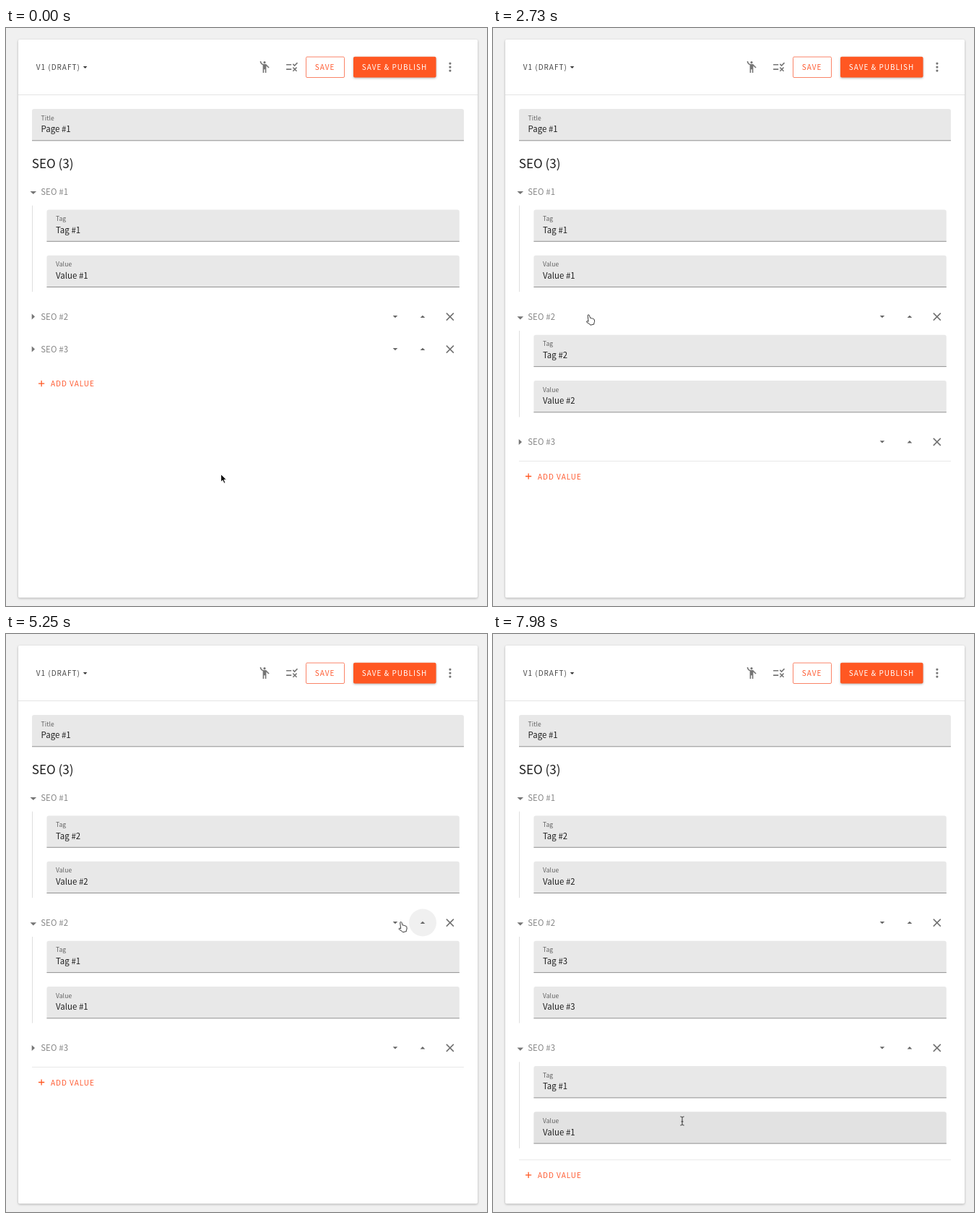
Recreate the animation shown at these times as an HTML page. Size 666 by 800 pixels, loop 8 s.

```html
<!DOCTYPE html>
<html lang="en">
<head>
<meta charset="utf-8">
<title>Reordering values</title>
<style>
  html, body { margin: 0; width: 100%; height: 100%; overflow: hidden; background: #f0f0f0; }
  svg.layer { position: absolute; left: 0; top: 0; width: 666px; height: 800px; }
  text { font-family: "Noto Sans CJK JP", "Noto Sans CJK SC", "Noto Sans CJK", "Open Sans", sans-serif; white-space: pre; }
  .button { font-size: 10px; font-weight: 500; letter-spacing: .99px; }
  .label { font-size: 8.55px; letter-spacing: .1px; fill: #606060; }
  .value { font-size: 11.4px; letter-spacing: .06px; fill: #202020; }
  .name { font-size: 11.4px; letter-spacing: .13px; fill: #868686; }
  .heading { font-size: 17.1px; fill: #1c1c1c; }
  .card { filter: drop-shadow(0 1px 1.5px rgba(0,0,0,.28)); }
  .publish { filter: drop-shadow(0 1.5px 1.5px rgba(0,0,0,.3)); }
  #glow {
    position: absolute; left: 26px; width: 614px; box-sizing: border-box;
    border: 2px solid rgb(77,213,192); border-radius: 2px;
    background: rgba(49,211,136,.16); box-shadow: 0 0 9px rgba(64,224,198,.75);
  }
</style>
</head>
<body>
<svg class="layer" id="page" viewBox="0 0 666 800"></svg>
<div id="glow"></div>
<svg class="layer" id="pointer" viewBox="0 0 666 800"></svg>
<script>
const LOOP = 8000, STEP = 70, BODY = 128.3;
const page = document.getElementById('page');
const glow = document.getElementById('glow');
const pointer = document.getElementById('pointer');

function add(parent, tag, attrs = {}, content) {
  const node = document.createElementNS('http://www.w3.org/2000/svg', tag);
  for (const key in attrs) node.setAttribute(key, attrs[key]);
  if (content) node.textContent = content;
  parent.append(node);
  return node;
}
const rect = (parent, x, y, width, height, attrs) =>
  add(parent, 'rect', { x, y, width, height, ...attrs });
const path = (parent, d, attrs) => add(parent, 'path', { d, ...attrs });
const text = (parent, x, y, content, cls, fill) =>
  add(parent, 'text', fill ? { x, y, class: cls, fill } : { x, y, class: cls }, content);
const move = (node, x, y) => node.setAttribute('transform', `translate(${x} ${y})`);
const show = (node, on) => node.setAttribute('visibility', on ? 'visible' : 'hidden');

function field(parent, x, y, width, label, value) {
  const box = path(parent, `M${x} ${y + 44}v-41q0-3 3-3h${width - 6}q3 0 3 3v41z`, { fill: '#e8e8e8' });
  rect(parent, x, y + 43.3, width, 1, { fill: '#929292' });
  text(parent, x + 12.5, y + 15.6, label, 'label');
  return { box, value: text(parent, x + 12.5, y + 32.3, value, 'value') };
}

function section(number, hasButtons) {
  const root = add(page, 'g');
  text(root, 48.2, 4.2, `SEO #${number}`, 'name');
  const closed = path(root, 'M35.7-4.2v8l4.3-4z', { fill: '#757575' });
  const opened = path(root, 'M33.5-.6h8.6l-4.3 4.2z', { fill: '#757575' });
  let circles = [];
  if (hasButtons) {
    circles = [539, 577].map(cx => add(root, 'circle', { cx, cy: -.3, r: 19, 'fill-opacity': 0 }));
    path(root, 'M535.6-1.9h6.6l-3.3 3.4z', { fill: '#666' });
    path(root, 'M573.6 1.3h6.6l-3.3-3.4z', { fill: '#666' });
    path(root, 'M609.8-5.2l10 10m0-10l-10 10', { stroke: '#707070', 'stroke-width': 1.5 });
  }
  const body = add(root, 'svg', { x: 0, y: 18.2, width: 666, height: 0, overflow: 'hidden' });
  rect(body, 36, 1, 1, 119.5, { fill: '#dedede' });
  const tag = field(body, 56.4, 6.8, 571.4, 'Tag', '');
  const value = field(body, 56.4, 70, 571.4, 'Value', '');
  return {
    circles, valueBox: value.box,
    update(y, open, content) {
      move(root, 0, y);
      body.setAttribute('height', BODY * open);
      show(closed, open === 0);
      show(opened, open > 0);
      tag.value.textContent = `Tag #${content}`;
      value.value.textContent = `Value #${content}`;
    }
  };
}

// Card and toolbar
rect(page, 17, 16, 636, 772.5, { rx: 2, fill: '#fff', class: 'card' });
rect(page, 17, 92, 636, 1, { fill: '#e4e4e4' });
text(page, 41.8, 58, 'V1 (DRAFT)', 'button', '#444');
path(page, 'M106.8 52.9h5.6l-2.8 3z', { fill: '#333' });
const icon = (x, y) => add(page, 'g', { transform: `translate(${x - 9.5} ${y - 9.5}) scale(.79)`, fill: '#757575' });
const person = icon(358, 54);
add(person, 'circle', { cx: 12, cy: 4, r: 2 });
path(person, 'M15.9 8.1C15.5 7.7 14.8 7 13.5 7H11C8.2 7 6 4.75 6 2H4c0 3.2 2.1 5.8 5 6.7V22h2v-6h2v6h2V10l4 4 1.4-1.4z');
path(icon(396, 54), 'M16.5 11L13 7.5 14.4 6l2.1 2.2 4.3-4.3 1.4 1.4zM11 7H2v2h9zM21 13.4L19.6 12 17 14.6 14.4 12 13 13.4l2.6 2.6-2.6 2.6 1.4 1.4 2.6-2.6 2.6 2.6 1.4-1.4-2.6-2.6zM11 15H2v2h9z');
rect(page, 415.5, 40, 53, 28.5, { rx: 1.5, fill: '#fff', stroke: '#fa8468' });
text(page, 427.8, 58, 'SAVE', 'button', '#ff5a30');
rect(page, 481, 39.8, 114.5, 28.7, { rx: 2, fill: '#ff5722', class: 'publish' });
text(page, 492.8, 58, 'SAVE & PUBLISH', 'button', '#fff');
for (const cy of [49.1, 54.1, 59.1]) add(page, 'circle', { cx: 614.9, cy, r: 1.6, fill: '#757575' });

// Form
field(page, 36, 112, 598, 'Title', 'Page #1');
text(page, 35.8, 194.3, 'SEO (3)', 'heading');
const sections = [section(1, false), section(2, true), section(3, true)];
const divider = rect(page, 36, -21.5, 598, 1, { fill: '#e8e8e8' });
const addRow = add(page, 'g');
path(addRow, 'M45 0h8.2M49.1-4.1v8.2', { stroke: '#ff5722', 'stroke-width': 1.3 });
text(addRow, 62, 4, 'ADD VALUE', 'button', '#ff5a30');

// Pointer shapes, each with its hot spot at the origin
const outline = { 'stroke-width': .9, 'stroke-linejoin': 'round' };
const shapes = {
  arrow: path(pointer, 'M0 0v10.8l2.5-2.3 1.9 4.2 1.9-.8-1.8-4.2h3.4z', { fill: '#111', stroke: '#fff', ...outline }),
  hand: path(pointer, 'M-1.3 1.2Q-1.4 0-.4 0T1 1.1l1.2 3.6q1.3-.7 1.9.4 1.3-.5 1.9.6 1.5-.2 1.8 1.2l.3 2.7-.8 2.2.1 1.3-5 1.2-.7-1.1-4.3-2.8q-1-1.3.2-1.7l2 .6z',
    { fill: '#fff', stroke: '#222', ...outline }),
  beam: path(pointer, 'M-2.6-6q2.1 0 2.6 1.1Q.5-6 2.6-6M0-4.9v9.8M-2.6 6Q-.5 6 0 4.9.5 6 2.6 6M-1.4.8h2.8', { fill: 'none', stroke: '#333', 'stroke-width': 1 })
};

// time, x, y, shape
const route = [
  [0, 297.5, 617.5, 'arrow'], [350, 297.5, 617.5, 'arrow'], [840, 190, 478, 'arrow'],
  [1400, 56, 400, 'hand'], [1540, 50, 395.5, 'hand'], [2520, 50, 395.5, 'hand'],
  [3360, 578, 404.5, 'hand'], [5110, 578, 404.5, 'hand'], [5250, 547, 398.5, 'hand'],
  [5390, 539, 400, 'hand'], [5880, 539, 400, 'arrow'], [6230, 547.5, 556, 'arrow'],
  [6790, 110, 571, 'hand'], [6930, 95.5, 572.5, 'hand'], [7280, 95.5, 572.5, 'arrow'],
  [7560, 180, 628, 'beam'], [7840, 262, 674, 'beam'], [LOOP, 262, 674, 'beam']
];
const upCircle = [[3290, 0], [3360, .05], [3570, .05], [3640, .14], [3850, .14], [4200, .06], [5460, .06], [5530, 0]];
const downCircle = [[5320, 0], [5390, .05], [5530, .05], [5600, .15], [5880, .15], [6160, .11], [7000, .1], [7140, 0]];
const flash = start => [[start - 1, 0], [start + 140, 1], [start + 700, .9], [start + 1120, 0]];

const clamp = v => Math.min(1, Math.max(0, v));
const smooth = p => p * p * (3 - 2 * p);

function track(keys, t) {
  if (t <= keys[0][0]) return keys[0][1];
  const next = keys.findIndex(k => k[0] > t);
  if (next < 0) return keys.at(-1)[1];
  const [a, b] = [keys[next - 1], keys[next]];
  return a[1] + (b[1] - a[1]) * (t - a[0]) / (b[0] - a[0]);
}

// cubic-bezier(.4, 0, .2, 1) solved by bisection
function standardEase(p) {
  if (p <= 0 || p >= 1) return clamp(p);
  let low = 0, high = 1, s;
  for (let i = 0; i < 20; i++) {
    s = (low + high) / 2;
    const x = 1.2 * s * (1 - s) ** 2 + .6 * s * s * (1 - s) + s ** 3;
    if (x < p) low = s; else high = s;
  }
  return s * s * (3 - 2 * s);
}
const expand = (t, start) => standardEase((t - start) / 225);

function render(t) {
  const open2 = expand(t, 1764), open3 = expand(t, 7136);
  const order = t < 3570 ? [1, 2, 3] : t < 5530 ? [2, 1, 3] : [2, 3, 1];
  const y2 = 399.8, y3 = y2 + 45 + BODY * open2, yAdd = y3 + 47.4 + BODY * open3;
  sections[0].update(226.5, 1, order[0]);
  sections[1].update(y2, open2, order[1]);
  sections[2].update(y3, open3, order[2]);
  sections[1].circles[0].setAttribute('fill-opacity', track(downCircle, t));
  sections[1].circles[1].setAttribute('fill-opacity', track(upCircle, t));
  sections[2].valueBox.setAttribute('fill', t >= 7770 ? '#e2e2e2' : '#e8e8e8');
  move(addRow, 0, yAdd);
  move(divider, 0, yAdd);
  show(divider, (t >= 1750 && t < 5530) || t >= 7280);

  const first = t < 5500;
  glow.style.top = first ? '207px' : '554px';
  glow.style.height = first ? '167px' : '39px';
  glow.style.opacity = track(flash(first ? 3570 : 5530), t);

  const next = route.findIndex(k => k[0] > t);
  const [a, b] = [route[next - 1], route[next]];
  const p = smooth((t - a[0]) / (b[0] - a[0]));
  for (const kind in shapes) show(shapes[kind], kind === a[3]);
  move(shapes[a[3]], a[1] + (b[1] - a[1]) * p, a[2] + (b[2] - a[2]) * p);
}

function tick() {
  const t = performance.now() % LOOP;
  render(Math.floor(t / STEP) * STEP);
  requestAnimationFrame(tick);
}
tick();
</script>
</body>
</html>
```
